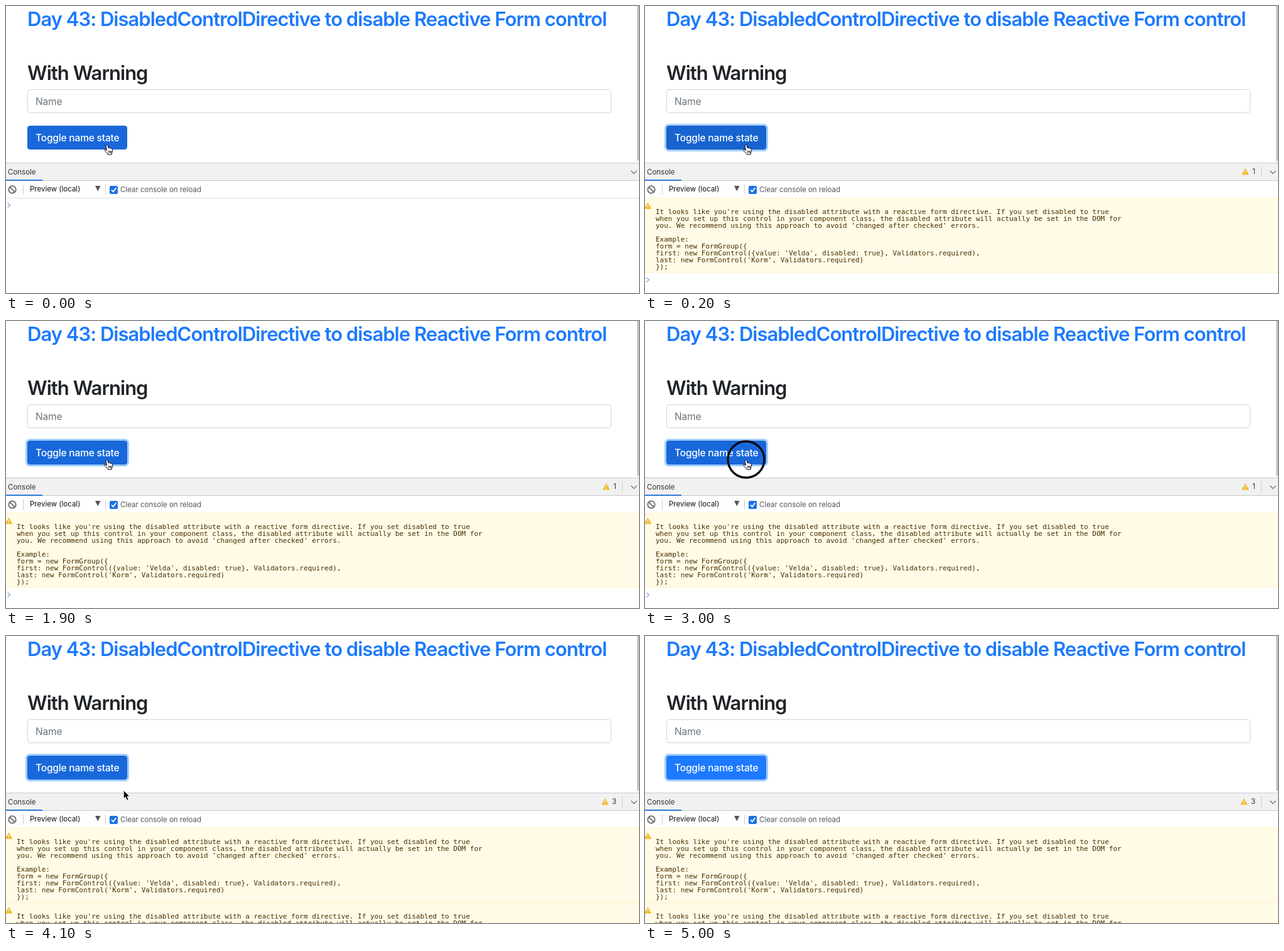
An HTML page for the animation above (5.1 s loop, 1008 px wide and 458 px high).

```html
<!DOCTYPE html>
<html lang="en">
<head>
<meta charset="utf-8">
<title>Disabled control demo</title>
<style>
  html, body { margin: 0; width: 100%; height: 100%; overflow: hidden; background: #fff; }
  svg { display: block; width: 100vw; height: 100vh; }
  text { font-family: Inter, Roboto, sans-serif; font-optical-sizing: none; white-space: pre; }
  .title { font-size: 31px; font-weight: 600; letter-spacing: -.98px; }
  .body { font-size: 15.5px; letter-spacing: -.18px; }
  .tool { font-size: 11.5px; fill: #333; }
  .log { font: 11px "DejaVu Sans Mono", monospace; fill: #472d00; }
</style>
</head>
<body>
<svg viewBox="0 0 1008 458">
  <defs>
    <g id="warn">
      <path d="M5 .6 10.2 10H-.2Z" fill="#f2b92b" stroke="#f2b92b" stroke-width=".8" stroke-linejoin="round"/>
      <path d="M5 3.4V6.8M5 7.9V9" stroke="#fff" stroke-width="1.2"/>
    </g>
    <g id="entry">
      <rect y="-1" width="1008" height="120" fill="#fff3c4"/>
      <rect width="1008" height="118" fill="#fffbe6"/>
      <use href="#warn" x="-.5" y="6.5"/>
    </g>
  </defs>

  <rect width="1008" height="458" fill="#fff"/>
  <rect x="1005" width="3" height="247" fill="#c3c3c3"/>
  <text class="title" x="34" y="32" fill="#1d7afc">Day 43: DisabledControlDirective to disable Reactive Form control</text>
  <text class="title" x="34" y="118" fill="#212529">With Warning</text>
  <rect x="34.5" y="133.5" width="929" height="37" rx="4" fill="#fff" stroke="#ced4da"/>
  <text class="body" x="47" y="158" fill="#6c757d">Name</text>
  <rect id="focus" x="31" y="188" width="165" height="44" rx="6.5" fill="#a1ceff"/>
  <rect id="button" x="34.5" y="191.5" width="158" height="37" rx="3.5"/>
  <text class="body" x="47" y="216" fill="#fff" font-weight="500">Toggle name state</text>

  <rect y="250" width="1008" height="28" fill="#f1f1f1"/>
  <path d="M0 250.5H1008M0 278.5H1008" stroke="#c8c8c8"/>
  <rect y="277" width="58" height="2" fill="#2b7bd6"/>
  <text class="tool" x="3" y="269">Console</text>
  <path d="M995.5 263 1000 267.5 1004.5 263" fill="none" stroke="#666" stroke-width="1.1"/>
  <g id="badge">
    <use id="badgeIcon" href="#warn" y="259"/>
    <text id="count" class="tool" x="972" y="268" text-anchor="end"></text>
    <path d="M981.5 256V273" stroke="#ccc"/>
  </g>

  <g fill="none" stroke="#757575" stroke-width="2">
    <circle cx="10" cy="293" r="5.7"/>
    <path d="M6 289 14 297"/>
  </g>
  <path d="M27.5 285V301M158.5 285V301" stroke="#ccc"/>
  <text class="tool" x="38" y="296" style="fill:#111">Preview (local)</text>
  <path d="M142 287H150.5L146.25 295.5Z" fill="#555"/>
  <rect x="165" y="287" width="13" height="13" rx="2" fill="#1a73e2"/>
  <path d="M168 293.5 170.7 296.3 175.3 290.3" fill="none" stroke="#fff" stroke-width="1.8"/>
  <text class="tool" x="182" y="297" style="fill:#555">Clear console on reload</text>
  <path d="M0 306.5H1008" stroke="#dedede"/>
  <g id="log"></g>
  <path id="prompt" d="M2.5 314.5 6.5 318 2.5 321.5" fill="none" stroke="#7ba6d2" stroke-width="1.2"/>

  <path id="hand" transform="translate(160.4 222)" fill="#fff" stroke="#000" stroke-linejoin="round"
    d="M-1.5 1C-1.5-.6 1.2-.8 1.6.8L2.6 4.6C3.4 3.8 4.6 4 5 5 5.8 4.4 7 4.8 7.2 5.7 8.2 5.3 9.2 6 9.2 7.2L9 10.5 7.8 13.5V15H1.8V14L-2.8 9.4C-4.3 7.8-2.8 6.6-1.2 7.6L.2 8.6ZM3.2 9V12.5M5.2 9V12.5M7 9V12.5"/>
  <path id="arrow" transform="translate(187.3 246.3)" fill="#000" stroke="#fff" stroke-width=".8"
    d="M0 0V13.3L3 10.6 5.3 15.9 7.8 14.8 5.5 9.700H9.5Z"/>
  <circle id="ring" cx="161" cy="221" r="29" fill="none" stroke="#080a0e" stroke-width="3.3"/>
</svg>
<script>
const LOOP = 5100, STEP = 100, ENTRY = 119;
const CLICKS = [100, 3000, 3700];
const LEAVE = 4100, GONE = 4200;
const COLORS = {
  idle: { fill: '#1d7aff', stroke: '#1d7aff' },
  hover: { fill: '#1868db', stroke: '#1662cd' },
  pressed: { fill: '#1763cf', stroke: '#155cc0' },
};
const MESSAGE = `It looks like you're using the disabled attribute with a reactive form directive. If you set disabled to true
when you set up this control in your component class, the disabled attribute will actually be set in the DOM for
you. We recommend using this approach to avoid 'changed after checked' errors.

Example:
form = new FormGroup({
first: new FormControl({value: 'Velda', disabled: true}, Validators.required),
last: new FormControl('Korm', Validators.required)
});`.split('\n');

const $ = id => document.getElementById(id);
const set = (el, attrs) => {
  for (const key in attrs) el.setAttribute(key, attrs[key]);
};
const show = (el, on) => set(el, { visibility: on ? 'visible' : 'hidden' });

function add(parent, tag, attrs, text = '') {
  const el = document.createElementNS('http://www.w3.org/2000/svg', tag);
  set(el, attrs);
  el.textContent = text;
  return parent.appendChild(el);
}

const entries = [0, 1].map(i => {
  const g = add($('log'), 'g', { transform: `translate(0 ${307 + i * ENTRY})` });
  add(g, 'use', { href: '#entry' });
  MESSAGE.forEach((line, n) => add(g, 'text', { class: 'log', x: 17, y: 25 + n * 11 }, line));
  return g;
});

function render(time) {
  const t = Math.floor(time % LOOP / STEP) * STEP;
  const warnings = CLICKS.filter(c => t >= c + STEP).length;
  const pressed = CLICKS.includes(t - STEP);

  show($('focus'), t >= CLICKS[0]);
  set($('button'), COLORS[t >= GONE ? 'idle' : pressed ? 'pressed' : 'hover']);
  show($('hand'), t < LEAVE);
  show($('arrow'), t >= LEAVE && t < GONE);
  show($('ring'), CLICKS.includes(t));

  show($('badge'), warnings > 0);
  set($('badgeIcon'), { x: 952 - warnings });
  $('count').textContent = warnings;
  entries.forEach((el, i) => show(el, i < warnings));
  set($('prompt'), { transform: `translate(0 ${warnings * ENTRY})` });
}

const start = performance.now();
function tick() {
  render(performance.now() - start);
  requestAnimationFrame(tick);
}
tick();
</script>
</body>
</html>
```
